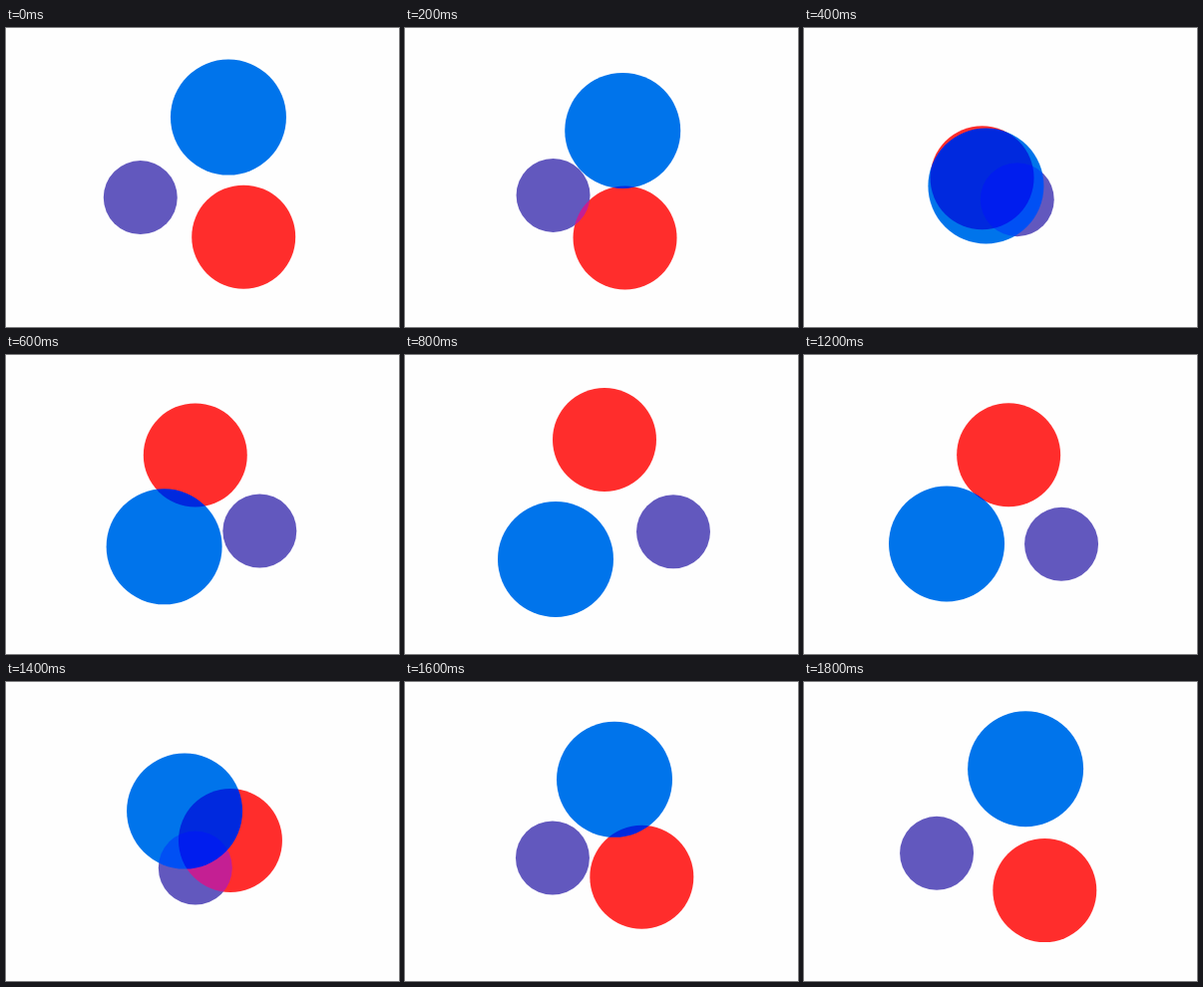
Write an HTML page that moves like this. It is 394x300 px and loops after 1900 ms.

```html
<!DOCTYPE html>
<html lang="en">
<head>
<meta charset="utf-8">
<title>Three circles</title>
<style>
  html, body { margin: 0; width: 100%; height: 100%; overflow: hidden; background: #fefefe; }
  svg { display: block; width: 394px; height: 300px; isolation: isolate; }
  circle { mix-blend-mode: hard-light; }
</style>
</head>
<body>
<svg id="stage" viewBox="0 0 394 300"></svg>
<script>
const SVG = 'http://www.w3.org/2000/svg';
const LOOP = 1900, STEP = 100, TURN = 850, RESTART = 1800;

// Each ball travels out along one curve and back along another.
const balls = [
  { r: 52, fill: '#ff2d2c',
    out: 'M241.8 209C153 226.5 176.5 106 200 85',
    back: 'M200 85L241.8 209' },
  { r: 37, fill: '#6258be',
    out: 'M133 172.2C134 159 267 180 269 177.3',
    back: 'M269 177.3C268 214 133 172.2 133 172.2' },
  { r: 58, fill: '#0074eb',
    out: 'M221.8 87C233.8 94.2 148 203 151 205',
    back: 'M151 205C113.2 182.2 221.8 87 221.8 87' }
];

function create(tag, attributes) {
  const element = document.createElementNS(SVG, tag);
  for (const name in attributes) element.setAttribute(name, attributes[name]);
  return element;
}

for (const ball of balls) {
  ball.out = create('path', { d: ball.out });
  ball.back = create('path', { d: ball.back });
  ball.circle = create('circle', { r: ball.r, fill: ball.fill });
  stage.append(ball.circle);
}

// Slow start, fast middle, long settle: a spline through knots 200 ms apart.
const KNOTS = [.021, 0, .021, .123, .597, .893, 1, .893];

function ease(ms) {
  const x = Math.min(ms / 200, 5), i = Math.min(Math.floor(x), 4), u = x - i;
  const [a, b, c, d] = KNOTS.slice(i, i + 4);
  return b + u / 2 * (c - a + u * (2 * a - 5 * b + 4 * c - d + u * (3 * (b - c) + d - a)));
}

function draw(now) {
  const t = Math.floor(now % LOOP / STEP) * STEP;
  const returning = t >= TURN && t < RESTART;
  const progress = ease(returning ? t - 800 : (t + 200) % LOOP);
  for (const { out, back, circle } of balls) {
    const path = returning ? back : out;
    const { x, y } = path.getPointAtLength(progress * path.getTotalLength());
    circle.setAttribute('cx', x);
    circle.setAttribute('cy', y);
  }
}

const start = performance.now();
function tick() {
  draw(performance.now() - start);
  requestAnimationFrame(tick);
}
tick();
</script>
</body>
</html>
```
